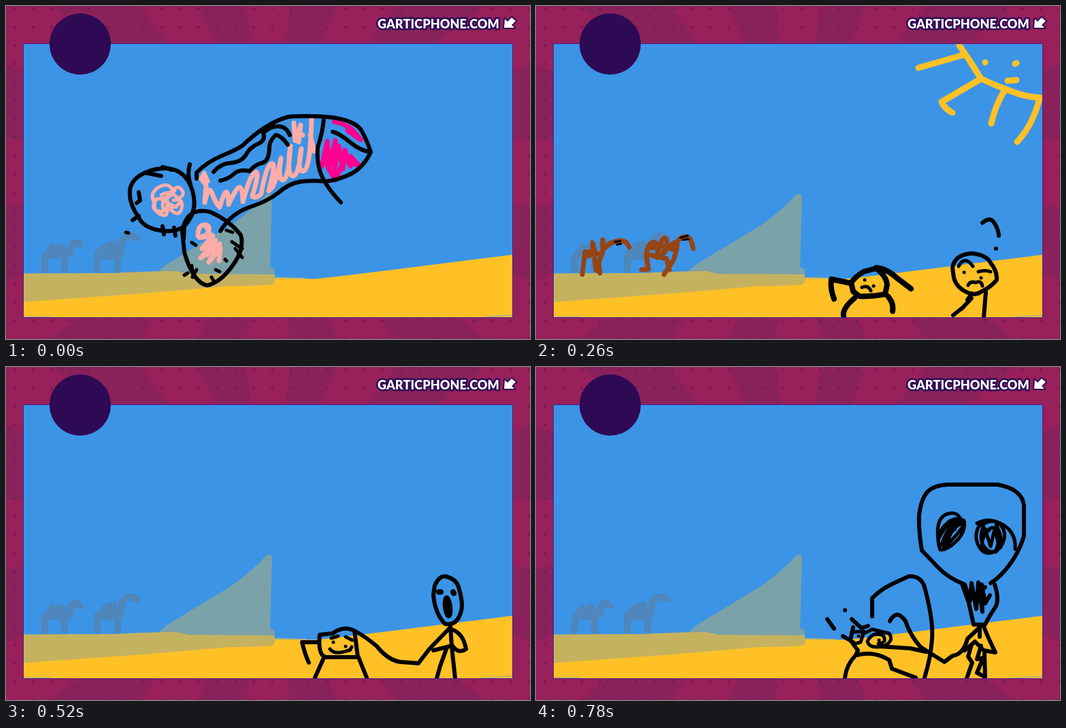
Recreate the animation shown at these times as an HTML page. Size 770 by 490 pixels, loop 910 ms.

```html
<!DOCTYPE html>
<html lang="en">
<head>
<meta charset="utf-8">
<title>Desert doodles</title>
<style>
  html, body { margin: 0; width: 100%; height: 100%; overflow: hidden; }
  body {
    background:
      radial-gradient(circle at 13px 13px, #7c1b57 1.8px, transparent 2.4px) 0 -9px / 27px 27px,
      repeating-conic-gradient(from -7.5deg at 50% 50%, #98205b 0 15deg, #89225b 15deg 30deg);
  }
  svg { display: block; width: 770px; height: 490px; }
  .url {
    font: 900 18px Lato, sans-serif; letter-spacing: .1px; fill: #fff; stroke: #2e0a54;
    stroke-width: 5px; paint-order: stroke; stroke-linejoin: round;
  }
  .pose { animation: show 910ms step-end infinite; animation-delay: calc((var(--i) - 7) * 130ms); visibility: hidden; }
  @keyframes show {
    0% { visibility: visible; }
    14.2857%, 100% { visibility: hidden; }
  }
  .pose, .herd { fill: none; stroke: #000; stroke-width: 6; stroke-linecap: round; stroke-linejoin: round; }
  .herd { stroke: #4f86bb; stroke-width: 10; }
  .sun { stroke: #ffc126; }
  .haze { stroke: #6c9fae; stroke-width: 17; }
  .glow { stroke: #5298d2; }
  .pink { stroke: #ffaca8; stroke-width: 7; }
  .hot { stroke: #ff0090; stroke-width: 7; }
  .brown { stroke: #964414; stroke-width: 7; }
  .dust { stroke: #775a52; }
  .red { stroke: #ff1010; }
  .mauve { stroke: #62559a; stroke-width: 2; }
  .hair { stroke-width: 3; }
  .thin { stroke-width: 5; }
  .wide { stroke-width: 8; }
  .ink { fill: #000; }
</style>
</head>
<body>
<svg viewBox="0 0 770 490">
  <defs><clipPath id="panel"><rect x="26" y="56" width="718" height="402"/></clipPath></defs>

  <rect x="25" y="55" width="720" height="404" rx="2" fill="#4a1a8c"/>
  <g clip-path="url(#panel)">
    <path fill="#3c94e6" d="M26 56H744V458H26Z"/>
    <path fill="#ffc126" d="M26 430L380 400L455 401.500Q540 392 640 379L744 366V458H26Z"/>
    <path fill="#7aa2a8" d="M222 392L236 380Q285 350 330 323Q362 300 382 278Q387 273 391 280L388 384Q395 385 395 392V398H265Z"/>
    <path fill="#c5b25f" d="M26 393.500L150 393L215 390.500L250 390L268 394L394 395Q398 403 393 409Q388 412 330 412L200 423L26 435.500Z"/>
    <path fill="none" stroke="#b9b277" stroke-width="2" d="M26 457.500H66M700 458L744 455M396 400L440 401"/>
    <g class="herd">
      <path d="M57 388V371L68 354L74 361L81 353L86 364V388M62 367H88Q96 364 96 351Q102 345 109 351"/>
      <path d="M134 388V366L148 353L158 350L164 366V388M138 362H162M142 368H164Q172 362 170 346Q180 333 193 342"/>
    </g>

    <g class="pose" style="--i:0">
      <path class="pink" d="M287 254L291 246L296 258L287 254L294 264L292 289Q298 262 303 276T314 296Q322 268 325 275T327 292Q340 264 344 267T348 288Q358 250 366 245T362 280Q368 284 375 276Q382 236 390 232T386 272Q396 268 404 224Q399 256 407 256T418 206Q412 248 421 250T434 210Q427 244 437 243T449 166M423 172L425 198L433 175L430 200L424 182L436 190M447 190L453 214"/>
      <path class="pink thin" d="M222 268Q238 258 244 270T221 284Q210 300 226 302T236 282Q250 260 258 270T246 286Q262 282 258 298T236 294Q240 312 228 307T219 290Q210 278 222 268ZM228 278Q240 270 252 282T232 299Q224 288 248 272L230 286L250 296"/>
      <path class="pink" d="M282 338Q282 322 292 322T296 336L284 341L304 338L288 357L308 345L286 371L314 350L298 377L315 356L313 375M293 322L300 336M302 340L296 366"/>
      <path class="hot" d="M464 236L472 199L475 236L484 198L482 246L489 206L495 240L498 212L506 236L506 221L519 235L496 227L490 242L484 256L474 240L468 222M482 170L494 173L508 181L521 197L502 183"/>
      <path d="M183 266Q188 252 205 245T238 239Q265 242 274 272T262 324Q248 334 225 330T195 311Q178 288 183 266ZM208 246L228 250M230 237L244 241M195 274L197 286L192 290M186 315L195 309M230 324L232 336M247 326L249 338M262 326L261 343"/>
      <path d="M259 332Q263 311 274 305T300 303Q328 315 345 337Q351 357 333 382T296 411Q286 410 277 397T262 362Z"/>
      <path d="M270 233Q266 248 271 262M280 254L280 245Q296 229 318 220T348 205Q382 172 415 163Q436 161 470 163Q508 166 521 181Q530 196 536 215Q525 238 507 247T470 258Q440 256 426 260T400 275Q385 287 358 296T315 331"/>
      <path d="M467 165Q466 184 458 208Q456 232 464 250T492 289M480 185Q491 188 505 200T535 215"/>
      <path d="M305 244Q315 232 330 231T352 220Q358 208 370 203T378 187Q388 177 400 177T417 190M315 257Q328 254 335 247T358 243Q366 233 376 231T387 210Q386 200 396 190Q404 190 414 204"/>
      <path class="thin" d="M176 333L180 334M273 348L279 352M273 382L275 399M262 396L267 393M324 330L333 333M332 347L347 357M337 357L347 370M322 373L324 375M308 388L314 391M302 399L306 406M280 388L274 399"/>
    </g>

    <g class="pose" style="--i:1">
      <path class="sun" d="M625 59L629 74Q640 97 657 107Q680 119 693 125Q715 131 742 134M566 88Q588 88 608 81L627 74M655 110Q640 115 628 127L624 123M609 132Q625 129 634 121M686 125Q680 140 677 162L668 185M738 136Q736 170 727 212M659 85h.1M703 85h.1M693 110H703"/>
      <path class="thin" d="M471 395Q478 388 487 388Q500 391 505 405L508 418Q500 430 485 427Q470 425 469 410ZM468 409Q460 409 456 404Q448 403 446 408L444 421M500 390Q508 384 514 387Q521 395 520 409M482 428Q468 428 468 445M507 424Q518 426 520 438M484 402h.1M497 414h.1M480 419Q485 417 493 422"/>
      <path class="thin" d="M623 385Q630 373 644 373Q660 376 665 390Q668 405 658 413Q650 418 640 417Q628 412 626 398ZM633 384h.1M653 392h.1M637 407L650 406M641 418Q648 430 641 436L627 443L624 456L644 453L650 448L669 456L671 449L661 441Q655 432 660 413L675 411"/>
      <path class="thin" d="M681 391L680 411Q686 399 690 403L691 411M697 412L700 402L705 409L708 402L707 414M711 412L715 403L718 412L722 403L725 416"/>
    </g>

    <g class="pose" style="--i:2">
      <path class="sun" style="stroke-width:9" d="M622 58L637 80L654 107Q680 119 700 126Q720 134 742 135M562 91L628 72M654 107Q625 124 596 141Q600 151 612 157M690 122Q675 145 669 173M740 136Q730 175 707 200M660 83h.1M704 85L706 84M693 110L706 109"/>
      <path class="brown" d="M68 395L72 362L84 361L83 348L88 366M94 393L92 378L98 362V344M73 369L86 364L95 366M86 372L88 388L94 392M97 362Q104 349 118 346Q132 342 137 355"/>
      <path class="brown" d="M155 388L165 387L162 368Q163 350 172 348T178 370Q184 338 190 342T186 366Q196 352 204 348T202 374L188 395M170 356L200 352M196 388L192 372L166 366M200 358Q204 349 212 342Q227 332 231 357"/>
      <path class="hair" d="M116 347L124 346M119 351L125 350M212 341L223 338M216 344L224 343"/>
      <path class="wide" d="M463 407Q470 398 481 391L500 386Q515 398 516 410L513 424Q495 428 475 427L466 420ZM463 408L434 402Q432 415 438 431M500 385Q515 386 530 400L551 416M468 430Q450 445 452 456M517 427Q526 437 524 449"/>
      <path class="thin" d="M483 403h.1M496 412h.1M479 414Q488 410 492 419"/>
      <path d="M612 385Q615 366 640 364Q662 366 668 378Q678 390 677 403Q668 414 655 420Q645 427 635 422Q618 415 614 400ZM641 423L634 432L640 430L625 446L628 443L613 455M661 421L658 458M656 319Q668 309 674 320Q680 330 680 338M676 357h.1"/>
      <path class="thin" d="M621 383Q630 366 642 383M650 391Q660 388 668 391M629 392h.1M654 400h.1M635 411Q638 404 646 407Q654 403 656 412"/>
    </g>

    <g class="pose" style="--i:3">
      <path class="haze" d="M623 62Q640 95 665 113Q700 132 742 135M564 92Q600 86 625 74M646 110Q640 125 603 142L614 154M679 128L668 163M729 140Q724 175 712 196"/>
      <path class="glow" d="M655 75Q662 64 675 66Q664 73 678 76M657 83Q664 94 678 87M712 61Q693 74 696 88Q706 99 715 84Q718 72 706 74M718 70L724 75M719 91L728 90M690 113Q699 108 709 110"/>
      <path class="dust" d="M238 372L239 352L252 350L254 342L266 356V343L258 334H270L268 344L258 352L242 355M294 338L293 316L300 310L306 319L317 322V299L312 303V296H321L319 300M298 321L316 313M343 303L342 289L350 286L356 300M345 290L357 289L354 275L362 278"/>
      <path d="M461 401Q475 388 487 386L512 387L510 424Q490 428 463 424ZM456 405L436 404L443 435M512 388Q530 400 550 415Q575 426 604 426L637 401M467 428L454 452M510 427L530 457M513 420L517 421"/>
      <path class="thin" d="M481 397L490 399M499 398L508 404M482 406h.1M498 412h.1M479 413Q483 424 497 419"/>
      <path fill="#1f68d8" d="M629 325Q632 320 660 319Q670 330 669 350Q667 368 648 386Q632 372 629 350Z"/>
      <path d="M638 332h.1M655 332h.1M649 386L641 417L635 426L634 440L622 458M650 388L655 430L660 458M637 401Q646 394 655 395L670 403V409L659 417L648 411L638 408L646 402"/>
      <ellipse class="ink" cx="644" cy="357" rx="4" ry="9" transform="rotate(-14 644 357)"/>
    </g>

    <g class="pose" style="--i:4">
      <path d="M461 394L480 392Q496 380 512 388L517 427L470 427Q458 424 461 394ZM460 405L435 405Q440 425 445 435M512 388Q530 398 545 411Q562 432 580 434L606 436L622 415L652 384M467 428L454 457M518 427L530 457"/>
      <path class="thin" d="M478 399L488 396M499 397L509 402M481 405h.1M499 411h.1M476 415Q483 425 506 416M505 417L508 412"/>
      <path d="M630 322Q636 307 646 308Q662 312 665 324Q673 350 668 362Q662 381 645 378Q630 362 628 335ZM653 381L655 412L660 458M647 415L638 440L633 458M655 386Q672 392 676 415Q665 423 656 410L628 417"/>
      <path class="wide" d="M636 331L639 331M657 331L658 333"/>
      <ellipse class="ink" cx="649" cy="353" rx="4" ry="14" transform="rotate(-7 649 353)"/>
    </g>

    <g class="pose" style="--i:5">
      <path d="M588 270Q590 225 628 217Q650 216 674 236Q690 260 683 295L673 326Q681 356 657 381L645 383Q634 345 626 328Q590 300 588 270Z"/>
      <g class="ink">
        <ellipse cx="615" cy="283" rx="6" ry="15" transform="rotate(-24 615 283)"/>
        <ellipse cx="650" cy="279" rx="7" ry="16" transform="rotate(-30 650 279)"/>
        <ellipse cx="652" cy="342" rx="8" ry="24" transform="rotate(-20 652 342)"/>
        <ellipse cx="486" cy="421" rx="8" ry="2.500" transform="rotate(25 486 421)"/>
      </g>
      <path d="M648 382L655 412L660 458M657 383Q670 405 672 417L658 423L653 409L626 416L652 386M646 414L637 440L633 458M626 417L602 433L571 425L570 448M571 424L585 415Q588 402 572 403M572 418L552 414"/>
      <path class="mauve" d="M612 393L617 411L625 418L622 400M626 418L627 404"/>
      <path d="M475 382L485 385L505 386L512 390L518 429L530 457M518 430H467L454 457M459 400L462 410L466 428M460 403L436 404Q427 415 440 436M458 353L463 367M438 370L437 384M448 392L460 395"/>
      <path class="thin" d="M480 402h.1M510 414h.1"/>
      <path class="red" d="M444 353L448 366L452 372M468 362L469 377M439 395L449 387L463 384M439 379h.1"/>
    </g>

    <g class="pose" style="--i:6">
      <path d="M628 319Q606 311 590 294T567 270Q562 240 563 218Q566 194 575 184T605 173L678 173Q696 176 706 184T717 204V248Q712 268 698 288T668 318"/>
      <path class="thin" d="M592 262Q585 222 605 216Q621 212 624 226M594 269Q586 250 600 234T629 226Q632 242 618 256T594 269ZM596 262Q606 230 624 227T599 267Q604 240 622 232T606 260Q606 244 616 238M592 252Q604 228 618 228"/>
      <path class="thin" d="M648 230Q666 220 686 232T704 268M651 234Q642 250 652 266T682 266Q694 248 684 234T651 234ZM658 232Q648 258 664 270T680 242Q668 228 658 250T676 272Q690 258 676 232M660 238L668 264L674 238L680 262M656 246L666 240"/>
      <path d="M626 319L636 347L643 379H660Q666 366 674 355T674 320"/>
      <path d="M630 320L638 344L640 318L647 356L650 317L656 360L655 320L660 348L667 336M634 330L648 336L660 324"/>
      <path d="M494 367V340Q506 328 520 321T548 308Q566 307 571 324Q584 372 582 400T571 457M520 374Q530 355 543 374Q550 395 565 412L600 434L612 425Q628 423 634 400L651 384M504 411L550 414L573 419"/>
      <path d="M652 382V397M658 382Q665 400 675 420L658 417L645 404L630 417M640 409L635 426L641 435L633 458M654 410L648 430L657 428L648 450L660 456L659 421"/>
      <path d="M428 371L438 385M454 358h.1M464 371L478 384L488 381M466 383L462 402L473 417L470 424Q456 438 454 457M472 424Q495 417 519 431L523 444L558 457M451 396L466 405"/>
      <path class="thin" d="M466 390L482 389L477 405L469 407M480 393L494 386L519 392Q527 404 510 411Q490 415 487 404Q494 388 510 395Q517 406 503 407M474 396h.1M504 402h.1"/>
    </g>
  </g>

  <circle cx="109" cy="56" r="45" fill="#2e0a54"/>
  <text class="url" x="546" y="33">GARTICPHONE.COM</text>
  <path d="M732 32L733 19L737 23L743 17L749 22L743 28L747 32Z" fill="#fff" stroke="#2e0a54" stroke-width="4" stroke-linejoin="round" paint-order="stroke"/>
</svg>
</body>
</html>
```
